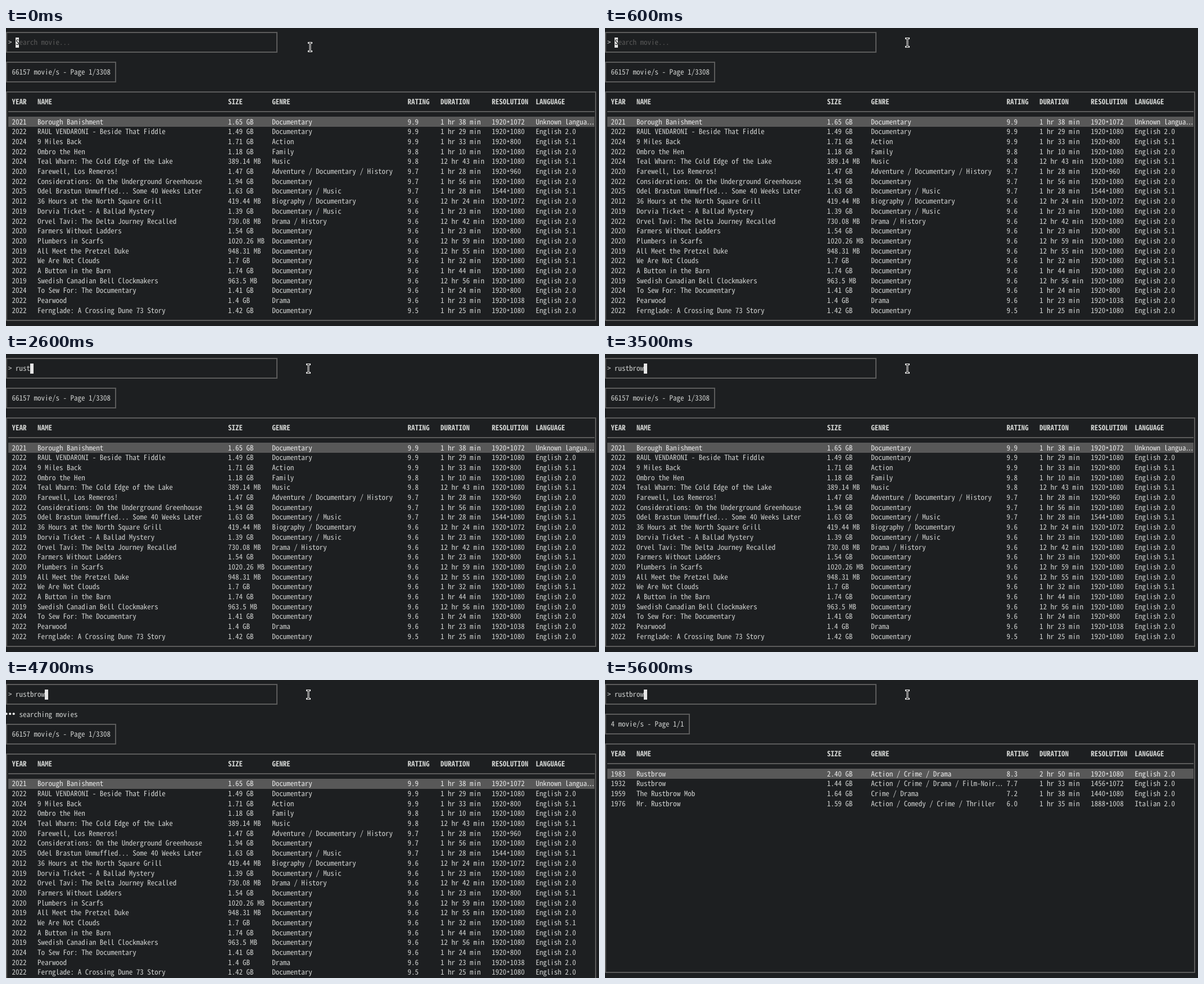
Write an HTML page that moves like this. It is 1055 px wide and 531 px high and loops after 8 s.

```html
<!DOCTYPE html>
<html lang="en">
<head>
<meta charset="utf-8">
<title>Movie search</title>
<style>
  html, body { margin: 0; width: 100%; height: 100%; overflow: hidden; background: #1d1f21; }
  svg { display: block; width: 1055px; height: 531px; }
  text {
    font-family: "Noto Sans Mono CJK JP", "Noto Sans Mono CJK SC", "Noto Sans Mono", "DejaVu Sans Mono", monospace;
    font-feature-settings: "zero";
    text-rendering: geometricPrecision;
    fill: #d0d2d0;
    white-space: pre;
  }
  .head { font-weight: bold; }
  .picked { fill: #e8e8e8; }
  .dim { fill: #585858; }
  .inverse { fill: #1d1f21; }
  .dots { font-family: "DejaVu Sans", sans-serif; }
  .line { fill: none; stroke: #5c5c5c; stroke-width: 2; }
  .bar { fill: #585858; }
  .block { fill: #e6e6e6; }
  .spin { fill: #f0f0f0; }
</style>
</head>
<body>
<svg id="stage" viewBox="0 0 1055 531"></svg>
<script>
const LOOP = 8000;
const CELL = 6.518, LEFT = -2.6, ROW = 17.68;
const COLUMNS = [2, 9, 61, 73, 110, 119, 133, 145];
const HEAD = "YEAR|NAME|SIZE|GENRE|RATING|DURATION|RESOLUTION|LANGUAGE";
const QUERY = "rustbrow";
const KEY_TIMES = [2000, 2300, 2500, 2600, 2900, 3100, 3300, 3500];
const SEARCH_START = 3900, SEARCH_END = 5600;
const SPINNER = [[3900, 0], [4100, 1], [4400, 2], [4700, -1], [4900, 0], [5200, 1], [5400, 2]];
const POINTER = [[0, 541, 34], [500, 539, 30], [600, 538, 26]];

const CATALOG = `2021|Borough Banishment|1.65 GB|Documentary|9.9|1 hr 38 min|1920*1072|Unknown langua…
2022|RAUL VENDARONI - Beside That Fiddle|1.49 GB|Documentary|9.9|1 hr 29 min|1920*1080|English 2.0
2024|9 Miles Back|1.71 GB|Action|9.9|1 hr 33 min|1920*800|English 5.1
2022|Ombro the Hen|1.18 GB|Family|9.8|1 hr 10 min|1920*1080|English 2.0
2024|Teal Wharn: The Cold Edge of the Lake|389.14 MB|Music|9.8|12 hr 43 min|1920*1080|English 5.1
2020|Farewell, Los Remeros!|1.47 GB|Adventure / Documentary / History|9.7|1 hr 28 min|1920*960|English 2.0
2022|Considerations: On the Underground Greenhouse|1.94 GB|Documentary|9.7|1 hr 56 min|1920*1080|English 2.0
2025|Odel Brastun Unmuffled... Some 40 Weeks Later|1.63 GB|Documentary / Music|9.7|1 hr 28 min|1544*1080|English 5.1
2012|36 Hours at the North Square Grill|419.44 MB|Biography / Documentary|9.6|12 hr 24 min|1920*1072|English 2.0
2019|Dorvia Ticket - A Ballad Mystery|1.39 GB|Documentary / Music|9.6|1 hr 23 min|1920*1080|English 2.0
2022|Orvel Tavi: The Delta Journey Recalled|730.08 MB|Drama / History|9.6|12 hr 42 min|1920*1080|English 2.0
2020|Farmers Without Ladders|1.54 GB|Documentary|9.6|1 hr 23 min|1920*800|English 5.1
2020|Plumbers in Scarfs|1020.26 MB|Documentary|9.6|12 hr 59 min|1920*1080|English 2.0
2019|All Meet the Pretzel Duke|948.31 MB|Documentary|9.6|12 hr 55 min|1920*1080|English 2.0
2022|We Are Not Clouds|1.7 GB|Documentary|9.6|1 hr 32 min|1920*1080|English 5.1
2022|A Button in the Barn|1.74 GB|Documentary|9.6|1 hr 44 min|1920*1080|English 2.0
2019|Swedish Canadian Bell Clockmakers|963.5 MB|Documentary|9.6|12 hr 56 min|1920*1080|English 2.0
2024|To Sew For: The Documentary|1.41 GB|Documentary|9.6|1 hr 24 min|1920*800|English 2.0
2022|Pearwood|1.4 GB|Drama|9.6|1 hr 23 min|1920*1038|English 2.0
2022|Fernglade: A Crossing Dune 73 Story|1.42 GB|Documentary|9.5|1 hr 25 min|1920*1080|English 2.0`.split("\n");

const MATCHES = `1983|Rustbrow|2.40 GB|Action / Crime / Drama|8.3|2 hr 50 min|1920*1080|English 2.0
1932|Rustbrow|1.44 GB|Action / Crime / Drama / Film-Noir…|7.7|1 hr 33 min|1456*1072|English 2.0
1959|The Rustbrow Mob|1.64 GB|Crime / Drama|7.2|1 hr 38 min|1440*1080|English 2.0
1976|Mr. Rustbrow|1.59 GB|Action / Comedy / Crime / Thriller|6.0|1 hr 35 min|1888*1008|Italian 2.0`.split("\n");

const stage = document.getElementById("stage");

// Choose the font size whose character advance equals one terminal cell.
function fitFont() {
  stage.innerHTML = '<text font-size="100">0000000000</text>';
  const advance = stage.firstChild.getComputedTextLength() / 1000;
  stage.setAttribute("font-size", CELL / advance);
}

const cellX = col => LEFT + col * CELL;
const edgeX = col => Math.floor(cellX(col) + 0.3);
const edgeY = row => Math.round(row * ROW - 0.7);
const lineX = col => Math.floor(cellX(col + 0.5) - 0.3);
const lineY = row => Math.round(row * ROW + 7.9);

// The ellipsis spans two cells; the asterisk sits at mid height.
function text(col, row, string, style = "") {
  const body = string
    .replace("…", '<tspan class="dots">…</tspan>')
    .replace(/\*(.*)/, '<tspan dy="2.5">*</tspan><tspan dy="-2.5">$1</tspan>');
  return `<text class="${style}" x="${cellX(col)}" y="${Math.round(row * ROW + 12.6)}">${body}</text>`;
}

function fill(col, row, cells, style) {
  const x = edgeX(col), y = edgeY(row);
  return `<rect class="${style}" x="${x}" y="${y}" width="${edgeX(col + cells) - x}" height="${edgeY(row + 1) - y}"/>`;
}

function box(top, bottom, lastCol) {
  const y = lineY(top);
  return `<rect class="line" x="1" y="${y}" width="${lineX(lastCol) - 1}" height="${lineY(bottom) - y}"/>`;
}

function fields(record, row, style) {
  return record.split("|").map((field, i) => text(COLUMNS[i], row, field, style)).join("");
}

function input(typed) {
  const content = typed
    ? text(3, 1, QUERY.slice(0, typed)) + fill(3 + typed, 1, 1, "block")
    : fill(3, 1, 1, "block") + text(3, 1, "S", "inverse") + text(4, 1, "earch movie...", "dim");
  return box(0, 2, 74) + text(1, 1, ">") + content;
}

function spinner(active) {
  let dots = "";
  for (let i = 0; i < 3; i++) {
    // The large dot is two cells wide and hides its right neighbour.
    if (active >= 0 && i === active + 1) continue;
    const big = i === active;
    const x = cellX(i + (big ? 1 : 0.5));
    dots += `<circle class="spin" cx="${x}" cy="60.3" r="${big ? 4.7 : 2}"/>`;
  }
  return dots + text(4, 3, "searching movies");
}

function table(records, summary, shift) {
  const top = 6 + shift, first = top + 3;
  return box(3 + shift, 5 + shift, summary.length + 3)
    + text(2, 4 + shift, summary)
    + box(top, 29 + shift, 161)
    + fields(HEAD, top + 1, "head")
    + `<path class="line" d="M${edgeX(1)} ${lineY(top + 2)}H${edgeX(161)}"/>`
    + fill(1, first, 160, "bar")
    + records.map((record, i) => fields(record, first + i, i ? "" : "picked")).join("");
}

function pointer([, x, y]) {
  const beam = `M${x - 2.5} ${y - 7.5}H${x + 2.5}M${x} ${y - 7.5}V${y + 7.5}M${x - 2.5} ${y + 7.5}H${x + 2.5}`;
  return `<path d="${beam}" fill="none" stroke="#f4f4f4" stroke-width="3" stroke-linecap="square"/>`
    + `<path d="${beam}" fill="none" stroke="#111" stroke-width="1"/>`;
}

const stepAt = (steps, t) => steps.filter(step => step[0] <= t).pop();

function scene(t) {
  const typed = KEY_TIMES.filter(time => time <= t).length;
  const searching = t >= SEARCH_START && t < SEARCH_END;
  const content = t < SEARCH_END
    ? table(CATALOG, "66157 movie/s - Page 1/3308", searching ? 1 : 0)
    : table(MATCHES, "4 movie/s - Page 1/1", 0);
  return input(typed)
    + (searching ? spinner(stepAt(SPINNER, t)[1]) : "")
    + content
    + pointer(stepAt(POINTER, t));
}

const CHANGES = [...POINTER.map(step => step[0]), ...KEY_TIMES, ...SPINNER.map(step => step[0]), SEARCH_END];
let shown = -1;

function tick() {
  const t = (performance.now() - start) % LOOP;
  const change = CHANGES.filter(time => time <= t).pop();
  if (change !== shown) {
    stage.innerHTML = scene(change);
    shown = change;
  }
  requestAnimationFrame(tick);
}

fitFont();
const start = performance.now();
tick();
</script>
</body>
</html>
```
